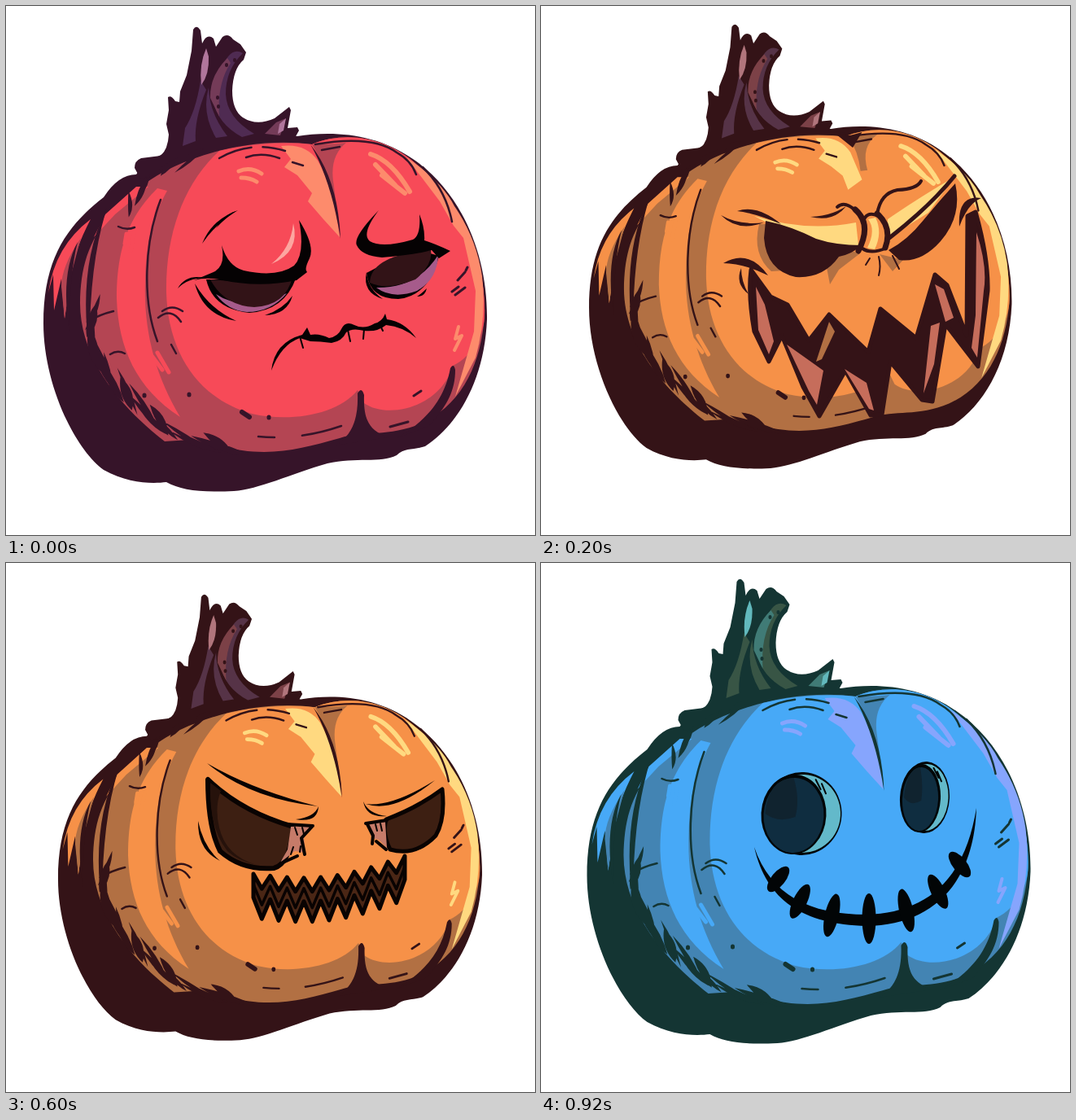
Animation, 650 px wide and 650 px high, one loop 1000 ms. Source, as an HTML page:

```html
<!DOCTYPE html>
<html lang="en">
<head>
<meta charset="utf-8">
<title>Pumpkin moods</title>
<style>
html, body { margin: 0; width: 100%; height: 100%; overflow: hidden; background: #fff; }
svg { display: block; width: 100vw; height: 100vh; }
</style>
</head>
<body>
<svg id="stage" viewBox="0 0 650 650"></svg>
<script>
const STEP = 200;

// Scale, offset and palette of each pumpkin
const orange = { dark: '#341317', main: '#f69148', shade: '#b27043', hi: '#ffd980', stem: '#563347', stem2: '#7c4147', tip: '#b1757c' };
const looks = [
  { fit: [1, 1, 0, 0], crease: true, right: true, face: gloomy,
    dark: '#361429', main: '#f74a58', shade: '#b44553', hi: '#fd8b6c', stem: '#4f2b52', stem2: '#743b58', tip: '#b0769c' },
  { fit: [.953, .956, 15.2, -1.9], crease: false, right: false, face: wicked, ...orange },
  { fit: [.989, .993, 17.5, -.8], crease: false, right: true, face: cheery,
    dark: '#101636', main: '#8c47fb', shade: '#7045b4', hi: '#d67cfd', stem: '#34425a', stem2: '#424a7c', tip: '#7177b4' },
  { fit: [.956, .96, 20, 14], crease: true, right: true, face: menacing, ...orange },
  { fit: [1, 1, 10.5, -6], crease: true, right: true, face: stitched,
    dark: '#143533', main: '#47a9f7', shade: '#4384b3', hi: '#86a5fd', stem: '#385545', stem2: '#407b76', tip: '#62b9bd' }
];

const fill = (d, c) => `<path d="${d}" fill="${c}"/>`;
const line = (d, c, w = 2.5, dash = 'none') =>
  `<path d="${d}" fill="none" stroke="${c}" stroke-width="${w}" stroke-dasharray="${dash}" stroke-linecap="round" stroke-linejoin="round"/>`;
const edged = (d, c, s, w) =>
  `<path d="${d}" fill="${c}" stroke="${s}" stroke-width="${w}" stroke-linejoin="round"/>`;
const oval = (x, y, rx, ry, turn, c) =>
  `<ellipse cx="${x}" cy="${y}" rx="${rx}" ry="${ry}" transform="rotate(${turn} ${x} ${y})" fill="${c}"/>`;
const range = (n, f) => Array.from({ length: n }, (_, i) => f(i));

function seeded(seed) {
  return () => (seed = seed * 16807 % 2147483647) / 2147483647;
}

// Stroke that swells in the middle and tapers at both ends
function blade(x0, y0, cx, cy, x1, y1, w) {
  const len = Math.hypot(x1 - x0, y1 - y0);
  const nx = -(y1 - y0) / len * w * 1.4, ny = (x1 - x0) / len * w * 1.4;
  return `M${x0},${y0}Q${cx + nx},${cy + ny} ${x1},${y1}Q${cx - nx},${cy - ny} ${x0},${y0}Z`;
}

// Point on the ellipse that follows the left edge of the flesh
function rim(deg, r) {
  const a = deg * Math.PI / 180;
  return [300 + 205 * r * Math.cos(a), 360 + 190 * r * Math.sin(a)];
}

// Tapered cuts running along that edge
function hatch(from, to, n, sweep, width, seed) {
  const rnd = seeded(seed);
  return range(n, i => {
    const a = from + (to - from) * i / (n - 1), depth = .9 + .08 * rnd(), reach = sweep * (.6 + .6 * rnd());
    return blade(...rim(a, depth), ...rim(a - reach * .55, depth + .03), ...rim(a - reach, 1.01), width * (.5 + rnd()));
  }).join('');
}

const hull = 'M160,207C190,165 300,150 358,160C400,153 455,156 500,188C560,229 592,306 591,385C588,460 555,515 515,541' +
  'C500,546 490,542 480,552C460,562 430,554 395,562C350,575 310,594 280,596C240,598 215,595 197,585' +
  'C180,587 150,587 120,570C85,545 46,465 46,390C46,310 75,270 120,235Q138,207 160,207Z';

const stemHull = 'M230,29Q234,22 239,30L241,46Q247,33 255,40L258,50L266,38Q273,33 279,41L288,47L295,57L292,66' +
  'Q279,77 278,104Q278,128 291,137Q308,148 330,138L348,124L350,128L346,150L358,149L360,153L355,162L376,165L380,175L300,195L165,212' +
  'L158,199Q158,190 166,187L190,184Q199,176 200,158L197,145L200,128L199,112Q203,109 208,117L213,118L214,105L222,85L228,55Z';

const flesh = 'M168,220C215,185 300,160 376,170C420,152 470,163 505,195C560,238 590,315 588,380C584,440 560,490 510,513' +
  'C470,530 440,521 410,531C360,545 320,556 260,540L225,533L195,535C150,500 91,440 91,365C92,310 105,270 168,220Z';

const front = 'M262,178C215,222 196,285 197,352C199,425 235,482 302,501C350,512 408,502 432,472L440,488' +
  'C470,509 535,492 549,442C575,430 588,400 588,380C590,315 560,238 505,195C470,163 420,152 376,170Q320,165 262,178Z';

const creases = 'M380,170Q450,158 480,180Q498,190 504,207M512,198Q540,225 548,265M190,238C170,290 167,362 186,412' +
  'M100,388Q115,379 132,375M128,428q9,-6 18,-1M187,383q16,-13 28,5M192,375q12,-9 25,0M138,271q10,5 20,1M203,416l6,11';

function body(k) {
  let s = fill(hull, k.dark) + fill(stemHull, k.dark);

  // Flesh: shadow first, lit areas over it
  s += fill('M104,262Q60,295 52,352L58,330L59,374L68,335L72,384L80,330Q84,300 104,262Z', k.main);
  s += fill('M92,285Q68,320 68,345L72,384L80,330Z', k.shade);
  s += fill(flesh, k.shade);
  s += fill('M186,224C147,262 136,305 136,360C138,420 160,470 214,505C184,455 169,400 171,340C172,290 180,260 198,227Z', k.main);
  s += fill('M122,256L108,284L134,256L175,222L160,222Z', k.main);
  s += fill(front, k.main);
  s += line('M158,276l-5,26M148,280l-2,12M180,431l12,16M186,426l14,24', k.main, 5);

  // Highlights
  s += fill('M338,172Q368,168 383,190' + (k.crease ? 'Q402,222 410,284L390,262L371,240L376,230' : 'L398,225L380,238L373,220') +
    'L358,208L342,198L350,188Z', k.hi);
  s += fill('M492,186Q535,215 551,246Q578,285 585,332Q591,382 577,432L552,480L575,400L577,350L562,285L550,270L533,240Z', k.hi);
  s += line('M286,203Q300,197 314,206M289,211Q300,211 308,216', k.hi, 5);
  s += line('M448,182Q474,190 496,228M454,195L478,220M462,208L490,230', k.hi, 6);
  if (k.right) s += line('M556,394l-4,15l8,-4l-9,18', k.hi, 4);

  // Grooves and hatching
  if (k.crease) {
    s += fill('M376,170Q402,170 418,168Q398,184 402,215L411,282Q406,220 376,170Z', k.shade);
    s += fill(blade(374, 170, 404, 214, 411, 286, 3), k.dark);
    s += fill('M432,476Q437,467 440,478C439,508 446,522 470,530L405,540C427,526 433,505 432,476Z', k.dark);
  } else {
    s += fill('M380,170Q405,168 418,167Q396,182 405,213L396,214Q393,188 380,170Z', k.shade);
    s += fill('M366,168L384,168L398,164L386,184Z', k.dark);
  }
  if (k.right) {
    s += fill('M546,445Q550,438 552,447C552,475 540,493 520,516L480,531C512,512 538,488 546,445Z', k.dark);
    s += line('M548,351l8,-6M552,355l12,-9M555,337l9,-10M565,325l2,-4M501,479l9,-6', k.dark, 3);
    s += line('M472,517l22,-6', k.dark, 3);
  }
  s += line(creases, k.dark);
  s += line('M262,187Q300,165 343,178M295,186Q314,179 336,187M352,192l13,4M388,177l22,-4', k.dark, 2.5, '42 14');
  s += line('M310,529Q360,534 412,516', k.dark, 2.5, '20 34 60');
  s += line('M290,499l9,6', k.dark, 6) + line('M170,478v1M225,477v1M323,505v1', k.dark, 5);
  s += fill(blade(124, 248, 94, 320, 103, 430, 5) + blade(88, 290, 72, 330, 78, 400, 4), k.dark);
  s += fill(hatch(182, 108, 20, 20, 6, 77), k.dark) + fill(hatch(216, 246, 7, -12, 4, 31), k.dark);

  // Stem
  s += fill('M291,58Q281,52 273,62Q253,88 254,115Q260,145 290,161L305,157Q271,137 270,108Q270,78 291,58Z', k.stem);
  s += fill('M272,64Q250,86 251,113L262,136Q259,96 276,70Z', k.stem2);
  s += fill('M239,92Q233,130 220,150L217,172L233,166Q231,140 246,103Z', k.stem);
  s += fill('M249,100Q240,132 258,162L272,160Q250,132 249,100Z', k.stem);
  s += fill('M246,52Q237,72 240,97Q250,84 249,62Z', k.tip);
  s += fill('M344,138L332,143L318,157L337,159Z', k.stem2) + fill('M344,138L336,145L334,157L341,153Z', k.tip);
  s += line('M271,72v1M281,66v1M260,112v1M261,123v1', k.dark, 4) + line('M258,132Q264,146 275,154', k.dark, 3);

  const [sx, sy, tx, ty] = k.fit;
  return `<g transform="matrix(${sx} 0 0 ${sy} ${tx} ${ty})">${s}</g>`;
}

function gloomy() {
  const ink = '#050203', pupil = '#321317', lid = '#a65b8b';
  return fill('M246,336Q254,372 299,377Q342,374 356,335Z', ink) +
    fill('M258,354Q290,376 345,353Q326,376 296,376Q272,374 258,354Z', lid) +
    fill('M251,336Q300,342 352,333Q344,368 305,370Q268,368 251,336Z', pupil) +
    fill('M231,337L257,326Q270,318 265,294Q273,320 292,325Q333,334 354,319Q368,304 360,263Q380,295 373,310Q366,324 370,327L357,337Q310,347 262,336Q245,333 231,337Z', ink) +
    fill(blade(211, 347, 222, 332, 244, 334, 2), ink) + fill(blade(232, 341, 246, 376, 283, 387, 4), ink) +
    fill(blade(318, 380, 343, 376, 352, 356, 3), ink) +
    fill(blade(241, 292, 255, 265, 285, 251, 2.5), ink) + fill(blade(258, 273, 270, 257, 283, 252, 1.5), ink) +
    fill('M353,267Q362,302 326,317Q350,298 353,267Z', '#fda6a0') +
    fill('M443,328Q447,360 482,360Q520,356 532,307L500,298Z', ink) +
    fill('M455,346Q505,347 531,306Q530,336 505,350Q475,361 455,346Z', lid) +
    fill('M447,340Q448,306 522,300Q525,318 503,336Q468,350 447,340Z', pupil) +
    fill('M458,251Q426,284 431,294Q437,307 462,309Q502,306 523,300L532,310L546,301Q527,292 514,288Q515,273 508,256Q510,282 500,287Q462,298 447,289Q436,280 458,251Z', ink) +
    fill(blade(443, 327, 441, 350, 463, 360, 3), ink) + fill(blade(505, 357, 513, 355, 517, 347, 2), ink) +
    fill('M326,448Q330,413 364,404L370,395L374,404Q385,402 397,408Q408,406 412,397Q417,386 428,392Q440,398 453,390Q462,388 466,378L468,385Q490,388 504,408Q488,394 467,392Q456,401 440,399Q425,395 418,401Q413,412 400,414Q386,412 374,412L361,408Q338,416 326,448Z', ink) +
    line('M361,406l4,14M420,398l3,14M440,397l-1,12M459,391l4,8', ink, 2);
}

function wicked(k) {
  const ink = k.dark, gum = '#c66d5b';
  let s = fill('M350,316L378,300L392,304L366,324L355,342ZM416,305L445,312L432,326Z', k.shade);
  s += fill('M268,268Q259,305 283,326L300,325Q276,300 280,268Z', k.shade);
  s += fill('M262,258Q325,278 387,266L390,294Q335,298 262,258ZM426,262Q462,237 508,210L476,254L425,286Z', k.hi);
  s += fill('M276,264Q306,270 338,286Q362,294 394,294Q382,305 366,308Q347,335 313,333Q277,325 274,285Z', ink);
  s += fill('M509,218Q518,258 491,289Q467,316 440,312L427,300Q450,288 470,263Q489,240 509,218Z', ink);
  s += fill(blade(241, 252, 264, 249, 295, 268, 4), ink) + fill(blade(221, 257, 243, 274, 274, 266, 3), ink);
  s += fill(blade(331, 259, 358, 262, 375, 246, 3), ink) + line('M364,247Q373,239 386,251', ink, 4);
  s += fill('M392,256Q402,246 416,255Q432,280 414,301L394,300Z', k.main) + fill('M402,262Q412,275 401,297L410,299Q420,278 411,260Z', k.hi);
  s += line('M386,250Q407,268 390,301M413,255Q432,272 423,297', ink, 7) + line('M397,262Q402,252 414,258M395,298Q405,305 423,298', ink, 4);
  s += line('M413,256Q417,230 438,226Q462,225 467,215', ink, 4) + line('M428,285Q478,246 508,209', ink, 5);
  s += line('M415,308Q418,320 415,331M404,310l-5,8M432,307l8,16', ink, 2);
  s += fill(blade(224, 316, 252, 307, 279, 331, 7), ink) + fill(blade(514, 271, 518, 237, 541, 236, 6), ink);
  s += fill(blade(246, 322, 242, 340, 255, 354, 3), ink);

  // Jaw
  s += edged('M258,324L282,357L303,367L329,411L354,379L402,425L417,372L461,408L484,330L499,343L523,405L524,258L534,253' +
    'Q550,310 549,350L537,443L497,391L481,486L468,484L429,437L419,502L405,503L374,448L342,504L322,468L296,405L280,437L262,400Q254,355 258,324Z', ink, ink, 5);
  s += fill('M264,345L275,367L286,412L280,428L267,398ZM302,416L333,438L347,448L339,490L329,473ZM373,446L400,463L409,497L403,495ZM479,393L490,389L483,440L470,476ZM535,278Q549,320 544,350L536,432L529,420L534,380Z', gum);
  s += fill('M484,342L495,348L507,383L497,388Z', gum) + fill('M354,388L361,400L345,434L338,437Z', k.shade);
  return s;
}

function cheery(k) {
  const ink = k.dark, edge = '#6c61c5';
  let s = fill('M318,374Q390,406 505,360L486,390L370,405L310,398Z', k.shade);
  s += line('M305,246C311,196 344,190 370,207L391,226', k.hi, 7);
  s += line('M300,262C302,190 340,174 374,194Q396,208 405,232M310,230Q324,195 356,206', ink, 3.5);
  s += line('M420,190Q455,176 490,205Q505,218 510,232', k.hi, 6) + line('M413,206Q430,184 466,198Q488,208 496,230', ink, 3);
  s += fill('M386,168L402,168L397,190Z', ink);
  for (const [x, y, rx, turn] of [[358, 291, 45, -10], [457, 255, 39, -17]]) {
    s += oval(x, y, rx, 62, turn, ink) + oval(x + 2, y, rx - 4, 57, turn, edge) + oval(x - 4, y, rx - 4, 60, turn, ink);
  }
  s += fill('M432,304Q446,345 444,377Q465,340 432,304Z', k.shade) + fill(blade(431, 304, 457, 340, 444, 377, 4), ink);
  s += fill('M246,328Q241,362 264,377L268,340Z', k.shade) + line('M240,329Q268,318 320,336', k.shade, 6);
  s += fill(blade(249, 330, 243, 363, 263, 376, 4), ink) + fill(blade(246, 326, 260, 324, 285, 337, 5), ink);
  s += edged('M266,338L291,330L325,348L317,391L302,397Q335,406 367,405L372,382Q425,393 463,375L478,371L486,389Q500,386 509,377' +
    'Q493,355 508,344Q505,310 516,275L524,266Q549,292 552,338Q550,412 524,456L511,425L475,432L488,473Q455,495 413,492L407,443L368,438L359,482Q282,438 266,338Z', ink, ink, 3);
  s += fill('M314,357L321,352L312,387L302,389ZM351,438L362,440L355,473L346,469Z', edge);
  s += fill('M527,290Q553,345 525,447L517,426Q538,370 527,290Z', edge);
  s += fill('M459,433L469,431L481,469Q450,485 418,484L417,477Q445,477 469,466Z', edge);
  s += line('M506,287Q513,258 525,260Q538,268 546,292', ink, 3);
  return s;
}

function menacing() {
  const ink = '#090302', iris = '#3d1f12', flesh = '#c67b69';
  const teeth = 18;
  // Zigzag from one mouth corner to the other, rising to the right
  const zigzag = (y, up, down) => range(teeth + 1, i =>
    [304 + 186 * i / teeth, y - 22 * i / teeth + 14 * Math.sin(Math.PI * i / teeth) + (i % 2 ? down : -up)]);
  const top = zigzag(390, 8, 9), mid = zigzag(406, 11, 13), low = zigzag(416, 5, 20);
  return edged('M248,266Q248,325 263,354Q290,378 329,375Q349,370 353,324Q290,306 248,266Z', iris, ink, 6) +
    fill('M251,270Q249,325 272,354Q285,366 308,371Q270,360 262,325Q256,300 264,280Z', '#26120b') +
    fill('M350,324L376,322L366,338L368,356L355,354L337,368L346,352Z', flesh) +
    line('M345,321L377,323M376,324l-13,14l4,20M338,369l20,-9', ink, 4) +
    line('M355,325l3,9M364,325l2,8M350,358l3,-9M361,355l1,-7', ink, 2) +
    fill(blade(247, 246, 301, 284, 383, 299, 4), ink) + fill(blade(384, 299, 381, 316, 356, 315, 3), ink) +
    fill(blade(236, 317, 239, 351, 263, 366, 3), ink) +
    edged('M467,315Q505,301 536,278Q540,315 528,335Q503,361 472,352Q462,333 467,315Z', iris, ink, 5) +
    fill('M446,320L466,318L468,350L458,340L449,338Z', flesh) +
    line('M442,320L468,316M444,321l7,14l-1,10M467,352l-12,-10', ink, 4) + line('M454,321l2,8M460,320l2,9', ink, 2) +
    fill(blade(442, 296, 475, 304, 527, 267, 3), ink) + fill(blade(439, 293, 444, 311, 468, 311, 2), ink) +
    edged(`M${top.join('L')}L${low.reverse().join('L')}Z`, '#4a2615', ink, 5) + line('M' + mid.join('L'), ink, 3.5);
}

function stitched() {
  const ink = '#020506', glow = '#63b9ca', iris = '#0f2d40';
  const eye = (x, y, rx, ry, shift) =>
    oval(x, y, rx, ry, 3, ink) + oval(x + 1, y, rx - 2.5, ry - 3, 3, glow) +
    oval(x - shift, y + 1, rx - shift + 1, ry - 2, 3, ink) +
    oval(x - shift, y + 2, rx - shift - 2, ry - 5, 3, iris) +
    fill(`M${x - rx + 4},${y}Q${x - rx + 8},${y - ry + 8} ${x - shift},${y - ry + 7}Q${x - 2},${y - ry * .35} ${x - shift * .8},${y + 4}Q${x - rx * .6},${y + 12} ${x - rx + 4},${y}Z`, '#10232f') +
    line(`M${x + rx * .35},${y - ry * .82}l6,12M${x + rx * .5},${y - ry * .72}l5,12`, ink, 2);
  const stitches = range(7, n => {
    const i = n - 3, a = i * 22 * Math.PI / 180;
    return oval(403 + 122 * Math.sin(a), 340 + 97 * Math.cos(a) - 3 * i, 8.5, 31 - 4 * Math.abs(i), -13 * i, ink);
  });
  return eye(320.5, 308, 49, 51, 10) + eye(472, 288, 30, 44, 6) +
    fill('M262,349C282,408 330,432 400,432C470,430 520,394 535,301C532,395 480,445 400,446C322,444 277,415 262,349Z', ink) +
    stitches.join('');
}

const stage = document.getElementById('stage');
stage.innerHTML = looks.map(k => `<g>${body(k)}${k.face(k)}</g>`).join('');
const poses = [...stage.children];

function draw() {
  const now = Math.floor(performance.now() / STEP) % poses.length;
  poses.forEach((g, i) => { g.style.display = i === now ? '' : 'none'; });
  requestAnimationFrame(draw);
}
draw();
</script>
</body>
</html>
```
